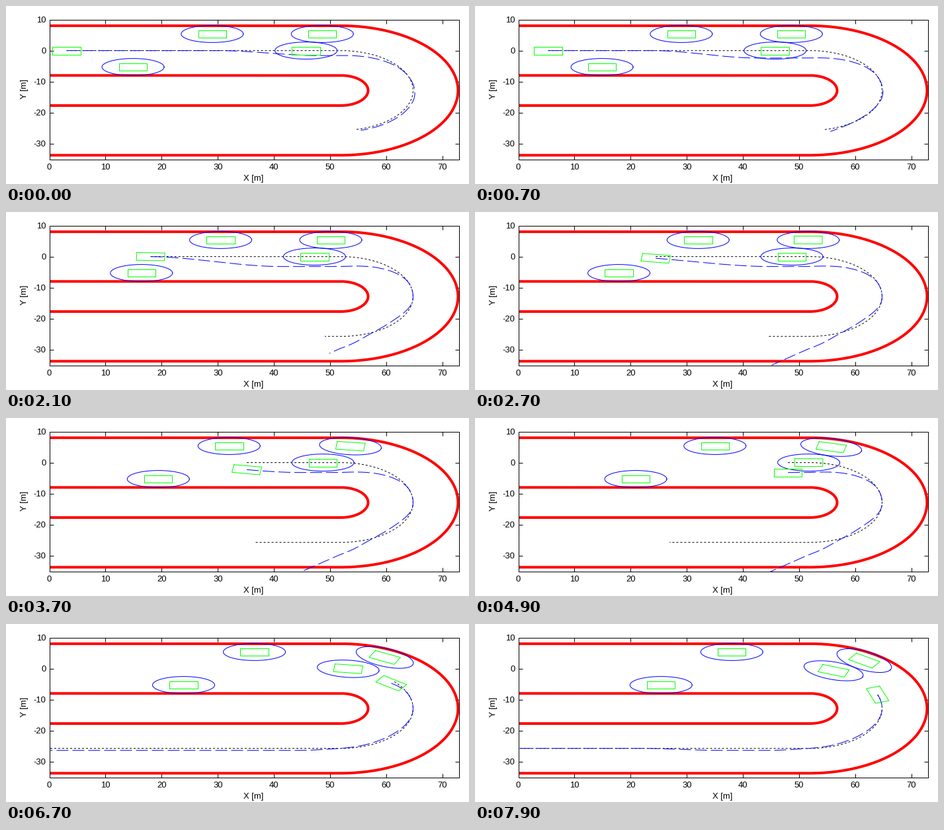
Write a matplotlib script that moves like this. It is 700x270 px and loops after 8000 ms.

```python
import numpy as np
import matplotlib.pyplot as plt
from matplotlib.animation import FuncAnimation

W, H, DPI = 700, 270, 100
PX = 72 / DPI                  # one pixel in points
FRAMES, STEP = 80, 100
L, R = 51.9, 12.85             # straight length and bend radius of the lane
S_MAX = L + np.pi * R + L      # arc length at the left edge of the return lane
REPLAN = 6.35                  # time of the switch to the return-lane plan

plt.rcParams.update({
    "font.family": "Liberation Sans",
    "font.size": 13 * PX,
    "axes.unicode_minus": False,
    "axes.linewidth": PX,
    "lines.scale_dashes": False,
})


def ease(x, a, b):
    p = np.clip((x - a) / (b - a), 0, 1)
    return p * p * (3 - 2 * p)


def hump(x, a, b):
    return np.sin(np.pi * np.clip((x - a) / (b - a), 0, 1)) ** 2


def road(s, d):
    """Point at arc length s, offset d towards the outside of the bend."""
    u = np.clip((s - L) / R, 0, np.pi)
    x = np.minimum(s, L) + (R + d) * np.sin(u) - np.maximum(s - L - np.pi * R, 0)
    return x, -R + (R + d) * np.cos(u)


def place(shape, s, offset):
    """Put a shape on the road, turned along the path offset(s)."""
    x, y = road(s, offset(s))
    x2, y2 = road(s + .6, offset(s + .6))
    a = np.arctan2(y2 - y, x2 - x)
    c, n = np.cos(a), np.sin(a)
    return x + c * shape[0] - n * shape[1], y + n * shape[0] + c * shape[1]


def dodge(s, a=17, b=45, depth=3.2):
    """Swerve to the inside of the lane and back."""
    return depth * (ease(s, 51, 68) - ease(s, a, b))


def plan(s, t):
    """Planned offset along the lane at time t."""
    if t < REPLAN:
        a, b, depth = (np.interp(t, [0, 1.4, 2.7], v)
                       for v in ([30, 18, 17], [48, 37, 45], [1.6, 3.2, 3.2]))
        w = ease(t, 0, 1.4)
        wide = .45 * ease(s, 66, 76)
        stray = .8 * np.logaddexp(0, s - 87.5) - .75 * hump(s, 73, 89)
        return dodge(s, a, b, depth) + (1 - w) * wide + w * stray
    w = ease(t, 6.7, 7.9)
    drift = .65 * ease(s, 90, 100) * (1 - w * ease(s, 108, 122))
    return dodge(s) + drift - .5 * hump(s, 72, 96)


# own car: slow start, cruise, braking in the bend
fine = np.arange(0, FRAMES * STEP) / 1000
speed = 3.2 + 7.5 * ease(fine, .65, 1.35) - 6.6 * ease(fine, 5.3, 6.7)
EGO_S = 3.06 + np.cumsum(speed) / 1000

# other cars: start, lane offset, first move (s), seconds per 1.5 m move
CARS = [
    (14.9, -5.3, 1.5, 1.0),
    (29.0, 5.35, 1.45, 1.15),
    (45.7, 0.0, 1.65, 1.04),
    (48.6, 5.35, 1.5, 1.0),
]

BOX = np.array([-1, 1, 1, -1, -1]) * 2.5, np.array([1, 1, -1, -1, 1]) * 1.25
turn = np.linspace(0, 2 * np.pi, 121)
OVAL = 5.53 * np.cos(turn), 2.75 * np.sin(turn)

fig = plt.figure(figsize=(W / DPI, H / DPI), dpi=DPI, facecolor="white")
ax = fig.add_axes([65.5 / W, 37.5 / H, 620 / W, 212 / H])
ax.set(xlim=(0, 73), ylim=(-35, 10),
       xticks=range(0, 71, 10), yticks=range(-30, 11, 10))
ax.tick_params(direction="in", length=6 * PX, width=PX, top=True, right=True)
ax.tick_params(axis="x", pad=7 * PX)
ax.tick_params(axis="y", pad=5 * PX)
fig.text(374 / W, 1 - 262 / H, "X [m]", ha="center", va="center")
fig.text(27.5 / W, 1 - 126 / H, "Y [m]", ha="center", va="center", rotation=90)


def line(color, width=1, dash=None):
    style = (0, [n * PX for n in dash]) if dash else "-"
    return ax.plot([], [], color=color, lw=width * PX, ls=style,
                   dash_capstyle="butt")[0]


lane = np.linspace(0, S_MAX, 400)
for side in (8, -8):
    line("#ff0000", 4).set_data(*road(lane, side))

center = line("#000000", dash=(3, 3))
track = line("#0000ff", dash=(18, 6))
ovals = [line("#0000ff") for _ in CARS]
boxes = [line("#00ff00") for _ in CARS]
ego = line("#00ff00")


def draw(i):
    t = i * STEP / 1000
    for (s, d, start, gap), oval, box in zip(CARS, ovals, boxes):
        s += 1.5 * max(0, np.floor((t - start) / gap + 1e-6) + 1)
        oval.set_data(*place(OVAL, s, lambda _: d))
        box.set_data(*place(BOX, s, lambda _: d))

    s = EGO_S[i * STEP]
    ego.set_data(*place(BOX, s, dodge))

    horizon = 89.6 + 7.9 * max(t - 1.4, 0)
    ref_end = horizon if t < 5.85 else S_MAX
    center.set_data(*road(np.linspace(s, ref_end, 300), 0))

    plan_end = min(horizon - .8, 101) if t < REPLAN else S_MAX
    ahead = np.linspace(s, plan_end, 300)
    track.set_data(*road(ahead, plan(ahead, t)))
    return [center, track, ego, *ovals, *boxes]


anim = FuncAnimation(fig, draw, frames=FRAMES, interval=STEP, repeat=True)
plt.show()
```
